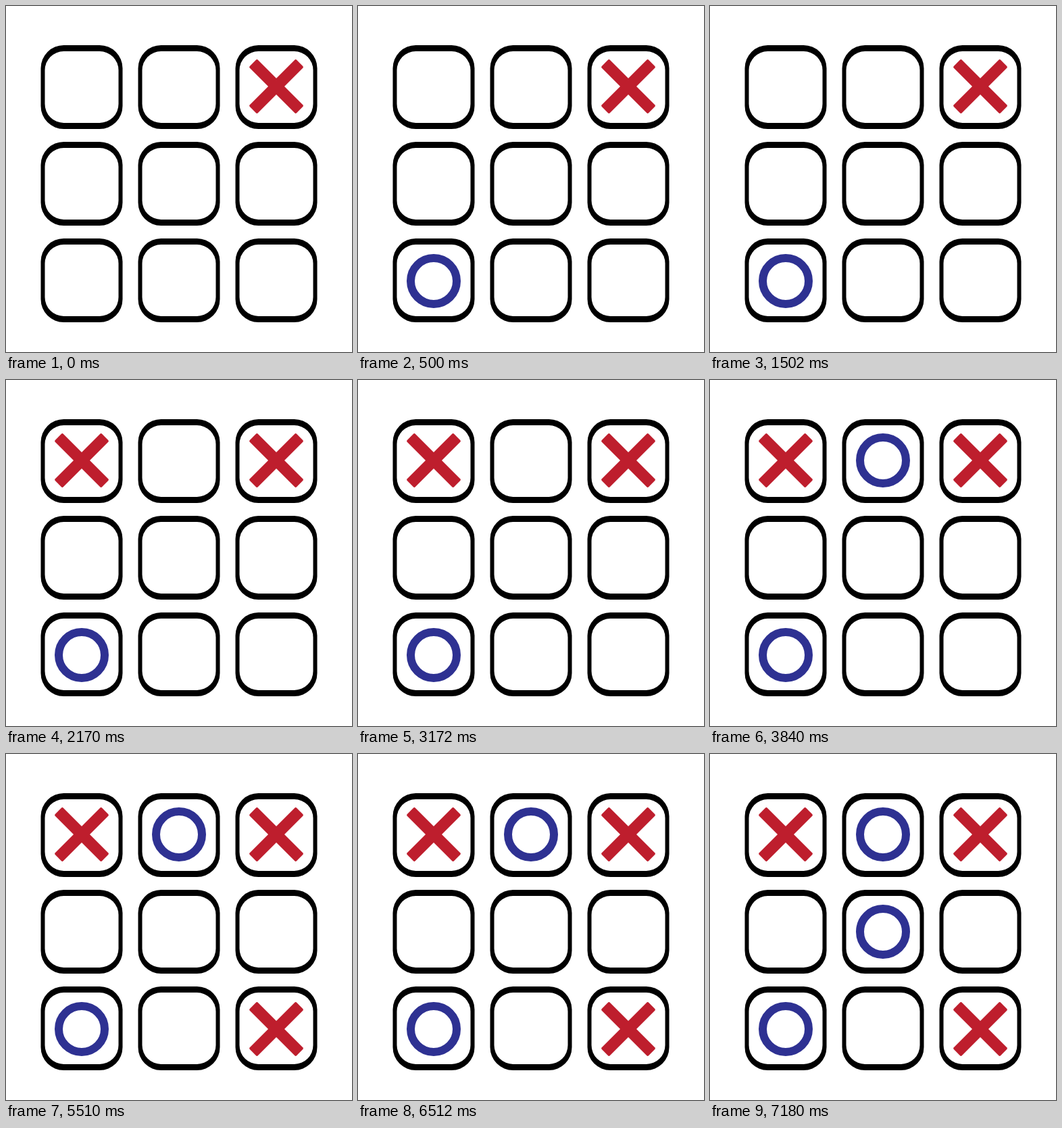
An HTML page for the animation above (8 s loop, 512 px wide and 512 px high).

```html
<!DOCTYPE html>
<html lang="en">
<head>
<meta charset="utf-8">
<title>Noughts and crosses</title>
<style>
  html, body { margin: 0; width: 100%; height: 100%; overflow: hidden; background: #fff; }
  svg { display: block; width: 100%; height: 100%; }
</style>
</head>
<body>
<svg viewBox="0 0 512 512">
  <defs>
    <g id="cell">
      <rect x="-60.5" y="-62" width="121" height="124" rx="34" fill="#000"/>
      <rect x="-54.5" y="-53" width="109" height="106" rx="28" fill="#fff"/>
    </g>
    <g id="cross" fill="#be1e2d">
      <rect x="-49" y="-8.5" width="98" height="17" rx="2" transform="rotate(45)"/>
      <rect x="-49" y="-8.5" width="98" height="17" rx="2" transform="rotate(-45)"/>
    </g>
    <circle id="nought" r="34" fill="none" stroke="#2e3192" stroke-width="12"/>
  </defs>
  <g id="board"></g>
</svg>
<script>
  const LOOP = 8000;
  // time, mark, column, row
  const MOVES = [
    [0, 'cross', 2, 0],
    [500, 'nought', 0, 2],
    [2170, 'cross', 0, 0],
    [3840, 'nought', 1, 0],
    [5510, 'cross', 2, 2],
    [7180, 'nought', 1, 1]
  ];
  const board = document.getElementById('board');

  function place(id, x, y) {
    const el = document.createElementNS('http://www.w3.org/2000/svg', 'use');
    el.setAttribute('href', '#' + id);
    el.setAttribute('transform', `translate(${x} ${y})`);
    board.append(el);
    return el;
  }

  for (let i = 0; i < 9; i++) {
    place('cell', 112 + 144 * (i % 3), 120 + 143 * Math.floor(i / 3));
  }

  const marks = MOVES.map(([at, id, col, row]) => ({
    at, el: place(id, 112 + 144 * col, 119 + 144 * row)
  }));

  const start = performance.now();

  function draw(now) {
    const t = Math.max(0, now - start) % LOOP;
    for (const { at, el } of marks) {
      el.setAttribute('visibility', t >= at ? 'visible' : 'hidden');
    }
    requestAnimationFrame(draw);
  }
  draw(start);
</script>
</body>
</html>
```
